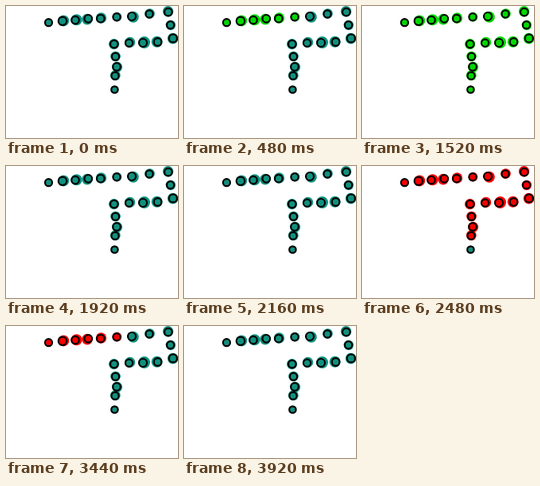
An HTML page with a canvas for the animation above (4000 ms loop, 216 by 165 pixels).

```html
<!DOCTYPE html>
<html lang="en">
<head>
<meta charset="utf-8">
<title>Dot trail</title>
<style>
  html, body { margin: 0; width: 100%; height: 100%; overflow: hidden; background: #fff; }
  canvas { display: block; }
</style>
</head>
<body>
<canvas width="216" height="165"></canvas>
<script>
const ctx = document.querySelector('canvas').getContext('2d');
const TEAL = '#10917f', GREEN = '#00d900', RED = '#f80000';
const LOOP = 4000, STEP = 80;

// ring x, y, radius, then halo x, y, radius
const dots = [
  [53.5, 20.7, 4.5, 53.5, 20.7, 4.5],
  [71, 18.8, 5.2, 72.3, 18.4, 7],
  [87, 17.6, 4.8, 88.6, 17.2, 7],
  [103.3, 15.8, 4.8, 102, 16.6, 6.8],
  [118.8, 15.7, 4.8, 119.5, 15, 6.7],
  [139, 13.8, 4.6, 139.5, 13.6, 5.8],
  [158, 13, 5, 159.8, 13.8, 7],
  [180, 10, 4.6, 180.5, 9.5, 6.3],
  [203.8, 7.6, 4.8, 203.5, 6.7, 6.7],
  [206.5, 23.8, 4.6, 206.8, 24, 6.2],
  [209.8, 40.4, 5, 209.5, 40.6, 6.8],
  [190.5, 45, 4.8, 189.6, 44.8, 7],
  [172, 46, 5, 173.6, 45.5, 7.4],
  [154.5, 46.2, 4.6, 155.6, 45.4, 6.6],
  [135.8, 47.6, 4.8, 135.6, 47.6, 6.6],
  [137.5, 63.2, 4.6, 137.5, 63, 6.3],
  [139, 76, 4.8, 139.6, 76.3, 6.5],
  [137, 87.2, 4.6, 137.3, 86.6, 6.4],
  [136.4, 104.5, 4.2, 136.4, 104.5, 4.2]
];

function colorAt(i, tick) {
  if (tick < 21) return i < tick ? GREEN : TEAL;        // fill forward
  if (tick < 30) {                                      // blink
    if (tick % 3 === 0) return TEAL;
    return tick < 25 ? GREEN : RED;
  }
  return i < dots.length - (tick - 30) ? RED : TEAL;    // drain backward
}

function circle(x, y, r) {
  ctx.beginPath();
  ctx.arc(x, y, r, 0, 2 * Math.PI);
}

function draw(now) {
  const tick = Math.floor(now % LOOP / STEP);
  ctx.fillStyle = '#fff';
  ctx.fillRect(0, 0, 216, 165);
  dots.forEach(([, , , x, y, r], i) => {
    ctx.fillStyle = colorAt(i, tick);
    circle(x, y, r);
    ctx.fill();
  });
  ctx.strokeStyle = '#000';
  ctx.lineWidth = 2.2;
  dots.forEach(([x, y, r], i) => {
    ctx.fillStyle = colorAt(i, tick);
    circle(x, y, r);
    ctx.fill();
    ctx.stroke();
  });
}

const start = performance.now();
function frame() {
  draw(performance.now() - start);
  requestAnimationFrame(frame);
}
frame();
</script>
</body>
</html>
```
